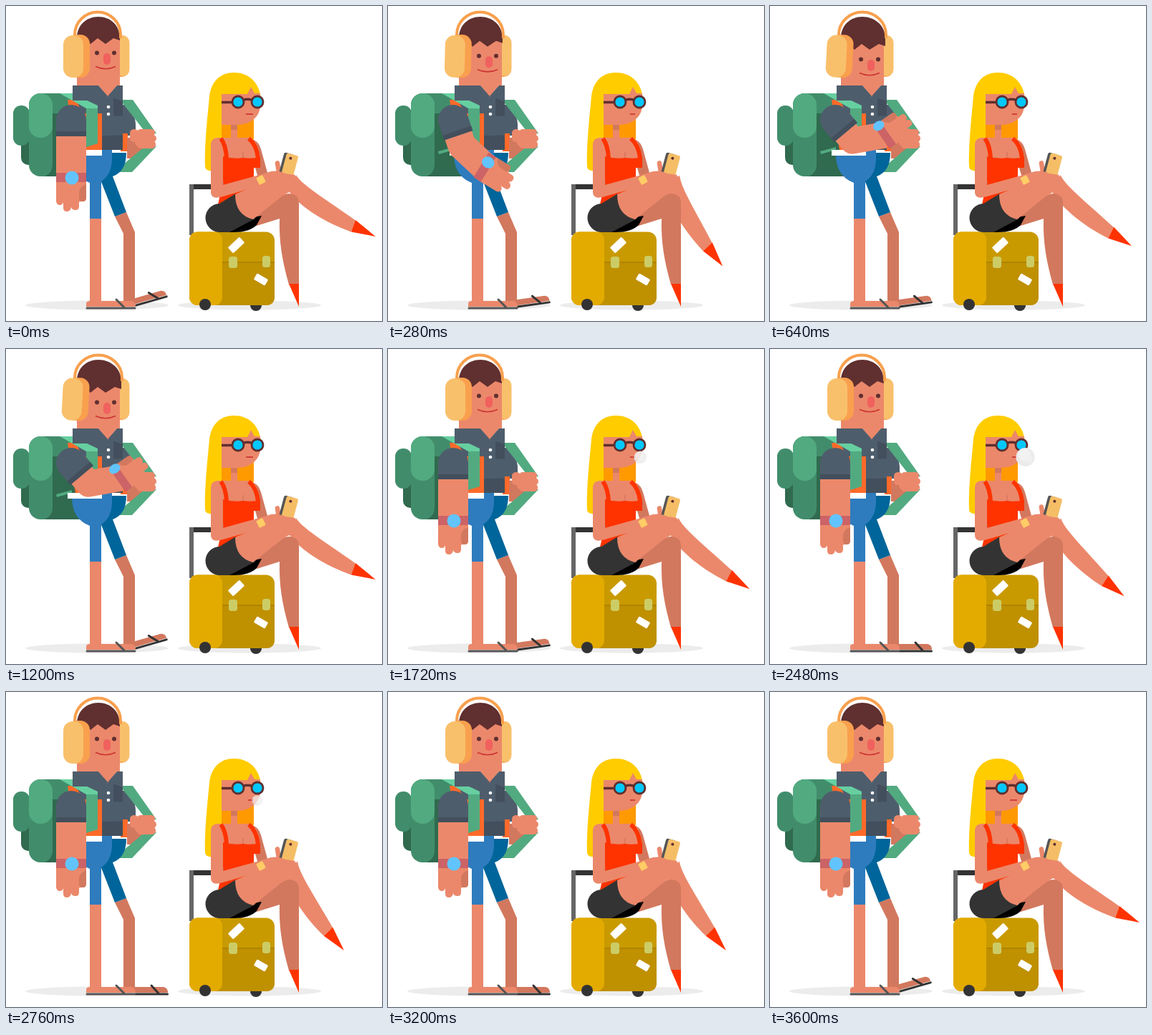
An HTML page that plays this animation: 525x440 px, repeating every 3640 ms.

```html
<!DOCTYPE html>
<html lang="en">
<head>
<meta charset="utf-8">
<title>Waiting travellers</title>
<style>
html, body { margin: 0; width: 525px; height: 440px; overflow: hidden; background: #fff; }
svg { display: block; }
.skin { fill: #eb886b; } .shade { fill: #d2785e; }
.green { fill: #418d6b; } .leaf { fill: #52aa80; } .moss { fill: #306a4f; }
.shirt { fill: #4e5d6c; } .cuff { fill: #434f5c; }
.pad { fill: #f9c06b; } .rim { fill: #f8a04e; }
.brown { fill: #602f2f; } .dark { fill: #333; } .red { fill: #ff3300; }
.line { fill: none; }
</style>
</head>
<body>
<svg width="525" height="440" viewBox="0 0 525 440">
  <g fill="#ececec">
    <ellipse cx="127" cy="418" rx="100" ry="6.5"/>
    <ellipse cx="340" cy="418" rx="100" ry="6.5"/>
  </g>

  <g id="man">
    <!-- backpack -->
    <rect class="moss" x="21" y="150" width="45" height="72" rx="10"/>
    <rect class="green" x="10" y="139" width="23" height="56" rx="11"/>
    <rect class="green" x="32" y="122" width="80" height="116" rx="16"/>
    <path class="moss" d="M65 150H112V238H54Q65 233 65 222Z"/>
    <rect class="leaf" x="32" y="122" width="33" height="62" rx="16"/>
    <path class="leaf" d="M70 203L92 197V201L71 207Z"/>

    <!-- far arm and strap -->
    <path class="shirt" d="M160 138H166Q181 150 181 166V181H160Z"/>
    <path fill="#ff6a2a" d="M160 178H170V203H160Z"/>
    <path class="shade" d="M169 184H190V203L176 213H169Z"/>
    <path class="leaf" d="M163 131H177L210 178H196L163 136Z"/>
    <path class="leaf" d="M194 196H210L176 232H158V226Z"/>

    <!-- legs -->
    <path class="shade" d="M152 294L168 288L180 316V414H164V318Z"/>
    <g id="foot">
      <path class="shade" d="M164 412H220Q226 413 226 420H164Z"/>
      <path class="line" stroke="#333" stroke-width="3" stroke-linecap="round" d="M181 422H225.500M203 410L213 421"/>
    </g>
    <path class="skin" d="M117 296H133V412H176Q181 414 181 420H112V416Q112 412 117 412Z"/>
    <path class="line" stroke="#555" stroke-width="3" stroke-linecap="round" d="M113 422H180M154 410L165 421"/>
    <path fill="#00659a" d="M134 205H168Q168 231 149 238L168 288L152 294L132 243Z"/>
    <path fill="#2e7cbe" d="M92 209H134V200H148V209Q149 235 133 245V297H117V247Q93 238 92 209Z"/>

    <!-- torso -->
    <path fill="#ff6a2a" d="M86 131H135V201H97Z"/>
    <path fill="#fff" d="M86 201H134V209H86Z"/>
    <path class="shirt" d="M97 130H135V150H107Z"/>
    <path class="shirt" d="M134 120H163V201H134Z"/>
    <path class="cuff" d="M150 127H163V201H134V181H150Z"/>
    <path class="shirt" d="M150 153.500H163V180.500H150Z"/>
    <path class="leaf" d="M112 140H128V192L112 197Z"/>
    <path fill="#66cfa0" d="M75 122H92L128 139V143H112Z"/>

    <!-- head -->
    <rect class="rim" x="148" y="41" width="24" height="58" rx="10"/>
    <rect class="pad" x="153" y="41" width="19.500" height="57" rx="10"/>
    <path class="skin" d="M99 40H159V111H155L142 127L129 111H99Z"/>
    <path class="shirt" d="M93 111H129L142 126L134 132H93ZM155 111H163V133L142 126Z"/>
    <g fill="#fff"><circle cx="143" cy="141" r="2.300"/><circle cx="143" cy="151" r="2.300"/></g>
    <path id="hair" class="brown"/>
    <path id="band" class="line" stroke="#f8a04e" stroke-width="4"/>
    <g id="face">
      <g class="brown"><circle cx="127" cy="65.500" r="3"/><circle cx="151" cy="65.500" r="3"/></g>
      <rect fill="#f1615e" x="136" y="66" width="10" height="16" rx="5"/>
      <path class="line" stroke="#c33" stroke-width="1.700" d="M125 84.500Q139 91 153 84.500"/>
    </g>
    <g id="phones">
      <rect class="rim" x="86" y="40" width="31" height="60" rx="13"/>
      <rect class="pad" x="80" y="41" width="28" height="59" rx="13"/>
    </g>

    <!-- near arm -->
    <path id="arm" class="line" stroke="#eb886b" stroke-linejoin="round"/>
    <g id="hand">
      <path class="skin" d="M-21 0H21V28Q21 33 16 33T11 34V40Q11 45 6 45T0 41Q-1 47 -6 47T-11 42V34Q-12 38 -16 38T-21 33Z"/>
      <path class="shade" d="M21 9V28Q21 33 16 33T11 28V20Q12 12 21 9Z"/>
      <path fill="#cc6366" d="M-21 -7H21V6H-21Z"/>
      <ellipse id="watch" ry="9.500" fill="#62c4ff"/>
    </g>
    <g id="sleeve">
      <path class="shirt" d="M-21 23V0A21 21 0 0 1 21 0V23Z"/>
      <path class="cuff" d="M-21 16H21V23H-21Z"/>
    </g>
    <g class="skin">
      <rect x="173" y="172" width="12" height="18" rx="5.500"/>
      <rect x="183" y="172" width="25" height="10" rx="5"/>
      <rect x="182" y="180" width="28" height="10" rx="5"/>
      <rect x="183" y="188" width="26" height="11" rx="5"/>
      <rect x="180" y="177" width="16" height="19" rx="5"/>
    </g>
  </g>

  <g id="woman">
    <!-- suitcase -->
    <path fill="#666" d="M256 249H262V320H256Z"/>
    <path class="dark" d="M262 249H290V256H262Z"/>
    <circle class="dark" cx="349" cy="418" r="8"/>
    <rect fill="#c99a00" x="256" y="315.500" width="119" height="102.500" rx="12"/>
    <path fill="#bf9000" d="M290 358H375V406Q375 418 363 418H290Z"/>
    <path fill="#ae8400" d="M300 357H375V359H300Z"/>
    <rect fill="#e3ab00" x="256" y="315.500" width="46" height="102.500" rx="11"/>
    <circle class="dark" cx="278" cy="417" r="8"/>
    <g fill="#fff">
      <rect x="-11" y="-5.500" width="22" height="11" rx="1.500" transform="translate(321.500 334) rotate(-43)"/>
      <rect x="-9" y="-5" width="18" height="10" rx="1.500" transform="translate(356 382) rotate(30)"/>
    </g>
    <g fill="#cc6">
      <rect x="311" y="350" width="12" height="16" rx="3.500"/>
      <rect x="358" y="349" width="11" height="16" rx="3.500"/>
    </g>

    <!-- hair and head -->
    <path fill="#f90" d="M300 150H346V186H300Z"/>
    <path fill="#fc0" d="M278 224C277 190 282 150 284 126C287 104 300 93 318 93C339 93 353 106 356 128L301 150V228Q292 232 284 230Q278 229 278 224Z"/>
    <path class="skin" d="M301 123H337L342 113L347 122H355V138C355 156 340 166 322 166H301Z"/>
    <path class="skin" d="M314 164H323V190H314Z"/>
    <path class="shade" d="M314 166H323V173H314Z"/>
    <path class="line" stroke="#602f2f" stroke-width="3.500" d="M301 134.500H316M331 131.500Q337 129 344 131.500"/>
    <g fill="#00c8ff" stroke="#602f2f" stroke-width="2.800">
      <circle cx="324" cy="134" r="8"/><circle cx="351" cy="134" r="8"/>
    </g>
    <path id="mouth" class="line" stroke="#c33" stroke-width="1.700"/>
    <g id="bubble">
      <circle cx="13" cy="-1" r="13" fill="#ebebeb"/>
      <circle cx="12" cy="-4" r="8.500" fill="#f2f2f2"/>
      <circle cx="18" cy="2" r="5" fill="#f0f0f0"/>
    </g>

    <!-- body -->
    <path class="shade" d="M346 187Q353 190 356 200L367 240H352L342 205Z"/>
    <path class="skin" d="M286 194Q286 184 297 184H314V180H323V184H340Q352 186 354 213H303V250H286Z"/>
    <path class="red" d="M303 210Q318 214 331 212Q343 214 355 211V226H346V277H296L303 245Z"/>
    <path class="line" stroke="#d2785e" stroke-width="1.400" d="M331 204V212"/>
    <path class="line" stroke="#ff3300" stroke-width="6" d="M300 185Q307 194 308 213M339 185Q350 194 352 213"/>

    <!-- legs -->
    <g id="shin">
      <path class="skin" d="M405 236C413 250 448 271 488 299.500L482 315.500C448 303 414 284 396 260Z"/>
      <path class="red" d="M488 299L516 322L482 315.500Z"/>
    </g>
    <path class="shade" d="M343 299L378 270Q393 257 405 265Q409 268 409 276V389H395C386 357 381 330 382 297L350 307Z"/>
    <path class="red" d="M395 388H409V420Z"/>
    <path d="M310 316L345 295L357 293L350 306Q340 316 318 316Z"/>
    <path class="dark" d="M298 276L321 262L348 297L312 316H299A20 20 0 0 1 298 276Z"/>
    <path class="skin" d="M320 263L385 235Q400 231 407 241L411 256Q394 258 380 270L345 298Q320 292 320 263Z"/>

    <!-- hand and phone -->
    <rect id="thumb" class="skin" x="-3" y="-18" width="6.500" height="23" rx="3.200"/>
    <g transform="translate(395.500 221.500) rotate(15)">
      <rect fill="#555" x="-11" y="-15" width="14" height="30" rx="3"/>
      <rect fill="#f5be66" x="-7.500" y="-15" width="17" height="30" rx="3"/>
      <circle class="brown" cx="-.5" cy="-9" r="2"/>
    </g>
    <path class="skin" d="M286 235H303V250L350 237L370 231Q381 229 390 234L404 236L396 246L362 249L303 266Q294 269 290 267Q286 265 286 260Z"/>
    <path class="line" stroke="#d2785e" stroke-width="1" d="M303 250V245"/>
    <rect fill="#fc6" x="-5" y="-5.500" width="10" height="11" rx="1.500" transform="translate(356 243) rotate(-27)"/>
  </g>
</svg>
<script>
const STEP = 40, FRAMES = 91;
const el = id => document.getElementById(id);
const set = (id, attrs) => { for (const k in attrs) el(id).setAttribute(k, attrs[k]); };
const move = (id, transform) => set(id, { transform });
const mix = (a, b, u) => a + (b - a) * u;
const ramp = (t, from, to) => Math.min(1, Math.max(0, (t - from) / (to - from)));
const ease = u => u * u * (3 - 2 * u);
const pulse = (t, a, b, c, d) => ease(ramp(t, a, b)) - ease(ramp(t, c, d));
// Mirrored cycle: 0, 1, ... , 1, 0
const mirror = (n, len) => Math.min(n % len, len - 1 - n % len);
const polar = ([x, y], len, deg) => {
  const r = deg * Math.PI / 180;
  return [x - len * Math.sin(r), y + len * Math.cos(r)];
};

function drawHead(u) {
  const dy = 8 * u, right = mix(159, 161, u), r = (right + 1 - 96) / 2;
  set('hair', { d: `M99 ${48 + dy}V45C99 27 112 15 129 15S${right} 27 ${right} 45V${48 + dy}` +
    `L${right - 9} ${45 + dy}L139 ${53 + dy}L128 ${45 + dy}L118 ${53 + dy}L108 ${45 + dy}Z` });
  set('band', { d: `M96 45V40A${r} 31.5 0 0 1 ${right + 1} 40V45` });
  move('face', `translate(0 ${9 * u})`);
  move('phones', `rotate(${3 * u} 100 45)`);
}

function drawArm(u) {
  const shoulder = [91, 159];
  const elbow = polar(shoulder, 38, -40 * u);
  const wrist = polar(elbow, mix(43, 46, u), -100 * u);
  set('arm', { d: `M${shoulder}L${elbow}L${wrist}`, 'stroke-width': mix(42, 37, u) });
  move('sleeve', `translate(${shoulder}) rotate(${-40 * u})`);
  move('hand', `translate(${wrist}) rotate(${-125 * u}) scale(${mix(1, .92, u)} ${mix(1, .87, u)})`);
  set('watch', { cx: mix(1, 17, u), rx: mix(9.5, 7, u) });
}

function draw(n) {
  const t = n * STEP;
  const look = pulse(t, 60, 520, 1220, 1680);
  drawHead(look);
  drawArm(look);

  const tap = mirror(n, 6);
  move('foot', `translate(0 ${1.5 * tap - 3}) rotate(${8 * tap - 16} 178 420)`);
  const swing = 1 - (1 - mirror(n, 15) / 7) ** 2;
  move('shin', `rotate(${26.9 * swing} 405 241)`);

  const gum = pulse(t, 1400, 1920, 2520, 3040);
  set('bubble', { transform: `translate(343.500 152) scale(${gum})`, opacity: Math.min(1, gum * 1.3) });
  set('mouth', { d: `M${335 + Math.min(3, 3 * tap)} 151H345` });
  move('thumb', `translate(381 ${234 + 3 * pulse(t, 800, 1160, 2240, 2640)}) rotate(-9)`);
}

const start = performance.now();
function tick() {
  draw(Math.floor((performance.now() - start) / STEP) % FRAMES);
  requestAnimationFrame(tick);
}
tick();
</script>
</body>
</html>
```
